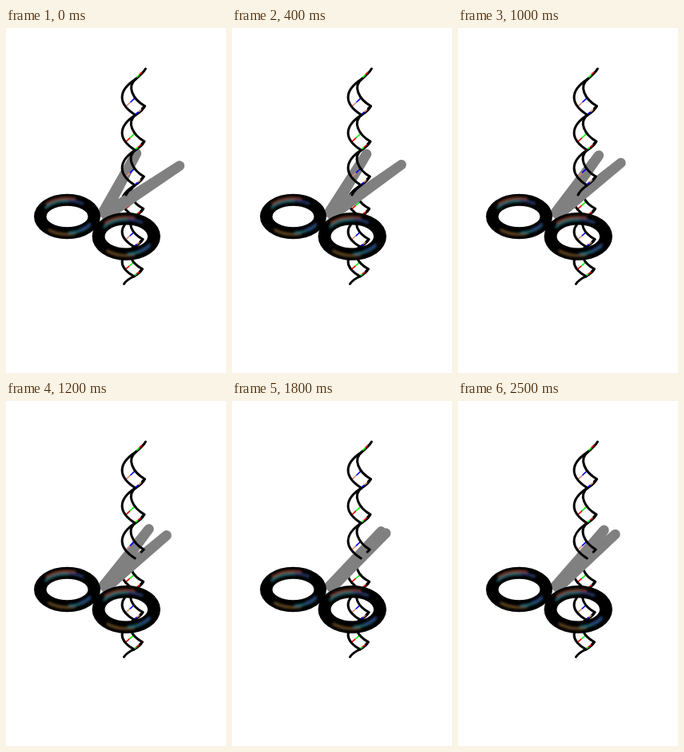
These frames come from a looping animation (275x432 px, 2.6 s). An HTML page:

```html
<!DOCTYPE html>
<html lang="en">
<head>
<meta charset="utf-8">
<title>Scissors cutting a double helix</title>
<style>
  html, body { margin: 0; width: 100%; height: 100%; overflow: hidden; background: #fff; }
  svg { display: block; width: 100vw; height: 100vh; }
  .strand { fill: none; stroke: #000; stroke-width: 3; stroke-linecap: round; stroke-linejoin: round; }
  .rung { stroke-width: 1.6; }
  .blade { fill: #808080; }
  .glow { fill: none; stroke-width: 3.4; stroke-linecap: round; }
</style>
</head>
<body>
<svg viewBox="0 0 275 432">
  <defs>
    <filter id="soft" filterUnits="userSpaceOnUse" x="0" y="190" width="275" height="120"><feGaussianBlur stdDeviation="1.7"/></filter>
  </defs>
  <g id="back"></g>
  <path class="blade" id="left"/>
  <path class="blade" id="right"/>
  <g id="front"></g>
  <g id="link"></g>
  <g id="rings"></g>
  <g id="glows" filter="url(#soft)"></g>
</svg>
<script>
const LOOP = 2600, STEP = 100, CLOSED = 2000, CUT = 1200;
const $ = id => document.getElementById(id);

function add(parent, tag, attrs) {
  const el = document.createElementNS('http://www.w3.org/2000/svg', tag);
  for (const k in attrs) el.setAttribute(k, attrs[k]);
  parent.appendChild(el);
}
const strand = (g, d) => add(g, 'path', { class: 'strand', d });

// A base pair: two coloured halves
function rung(g, x1, y1, x2, y2, a, b) {
  const mx = (x1 + x2) / 2, my = (y1 + y2) / 2;
  add(g, 'line', { class: 'rung', x1, y1, x2: mx, y2: my, stroke: a });
  add(g, 'line', { class: 'rung', x1: mx, y1: my, x2, y2, stroke: b });
}

const RED = '#f00000', GREEN = '#00ff00', BLUE = '#0000ff', TAN = '#e08878';
const crossings = [64, 109, 153, 197, 236, 274, 311];

function lobe(i) {
  const y0 = crossings[i], y1 = crossings[i + 1], h = y1 - y0;
  const s = 1 - i * 0.022;
  const X = x => 145 + (x - 145) * s, Y = k => y0 + h * k;
  const g = i < 3 ? $('front') : $('back');
  const cut = i === 2, joint = cut ? $('link') : g;
  const even = i % 2 === 0;
  rung(g, X(150), Y(.76), X(161), Y(.53), even ? TAN : RED, even ? BLUE : GREEN);
  strand(g, `M${X(162)} ${y0}C${X(139)} ${Y(.33)} ${X(140)} ${Y(.7)} ${X(162)} ${y1}`);
  strand(g, `M${X(162)} ${y0}C${X(151)} ${Y(.2)} ${X(158)} ${Y(.55)} ${X(173.5)} ${Y(.75)}l-3 3`);
  strand(joint, `M${X(173.5)} ${Y(.75)}Q${X(171)} ${Y(.87)} ${X(162)} ${y1}` + (cut ? 'Q153 203 150 209' : ''));
  rung(joint, X(162), Y(.98), X(169), Y(.85), even ? BLUE : GREEN, even ? TAN : RED);
}

strand($('front'), 'M174.500 51Q171 57 162 64');
rung($('front'), 163.5, 62, 170, 55, GREEN, RED);
for (let i = 0; i < 6; i++) lobe(i);
strand($('back'), 'M160 311Q151 315 147.500 320.500');

// Sheen on the tube: depth (0 inner, 1 outer), start and end angle, colour
const sheen = [
  [.62, 225, 285, '#7c3a20'],
  [.42, 215, 275, '#20646c'],
  [.45, 275, 305, '#28386c'],
  [.6, 75, 130, '#684820'],
  [.48, 35, 85, '#1f6a74'],
  [.42, 30, 60, '#28447c'],
];

function torus(cx, cy, rx, ry, hx, hy) {
  const oval = (a, b) => `M${cx - a} ${cy}a${a} ${b} 0 1 0 ${2 * a} 0a${a} ${b} 0 1 0 ${-2 * a} 0z`;
  add($('rings'), 'path', { d: oval(rx, ry) + oval(hx, hy), 'fill-rule': 'evenodd' });
  for (const [f, from, to, stroke] of sheen) {
    const a = hx + (rx - hx) * f, b = hy + (ry - hy) * f;
    const at = deg => {
      const r = deg * Math.PI / 180;
      return `${cx + a * Math.cos(r)} ${cy + b * Math.sin(r)}`;
    };
    add($('glows'), 'path', { class: 'glow', stroke, d: `M${at(from)}A${a} ${b} 0 0 1 ${at(to)}` });
  }
}
torus(76.5, 236, 41.5, 28.3, 26, 13.2);
torus(150.3, 261, 42.7, 30, 26.8, 14.5);

// Quadratic through the open, halfway and closed values
const bend = (u, a, b, c) =>
  a * (1 - u) * (1 - 2 * u) + b * 4 * u * (1 - u) + c * u * (2 * u - 1);

// Tapered bar from the hinge to a round tip
function blade(id, x, y) {
  const hx = 119.5, hy = 237, wide = 8, r = 6.2;
  const len = Math.hypot(x - hx, y - hy);
  const nx = (hy - y) / len, ny = (x - hx) / len;
  $(id).setAttribute('d',
    `M${hx - nx * wide} ${hy - ny * wide}L${x - nx * r} ${y - ny * r}` +
    `A${r} ${r} 0 0 1 ${x + nx * r} ${y + ny * r}L${hx + nx * wide} ${hy + ny * wide}z`);
}

function draw(now) {
  const t = Math.floor((now % LOOP) / STEP) * STEP;
  const u = 1 - Math.abs(t - CLOSED) / CLOSED;
  blade('left', bend(u, 163, 176, 189), bend(u, 157, 159.5, 164.5));
  blade('right', bend(u, 217, 203.5, 189.5), bend(u, 172.5, 169, 164.5));
  $('link').style.display = t < CUT ? '' : 'none';
}

const start = performance.now();
function tick() {
  draw(performance.now() - start);
  requestAnimationFrame(tick);
}
tick();
</script>
</body>
</html>
```
